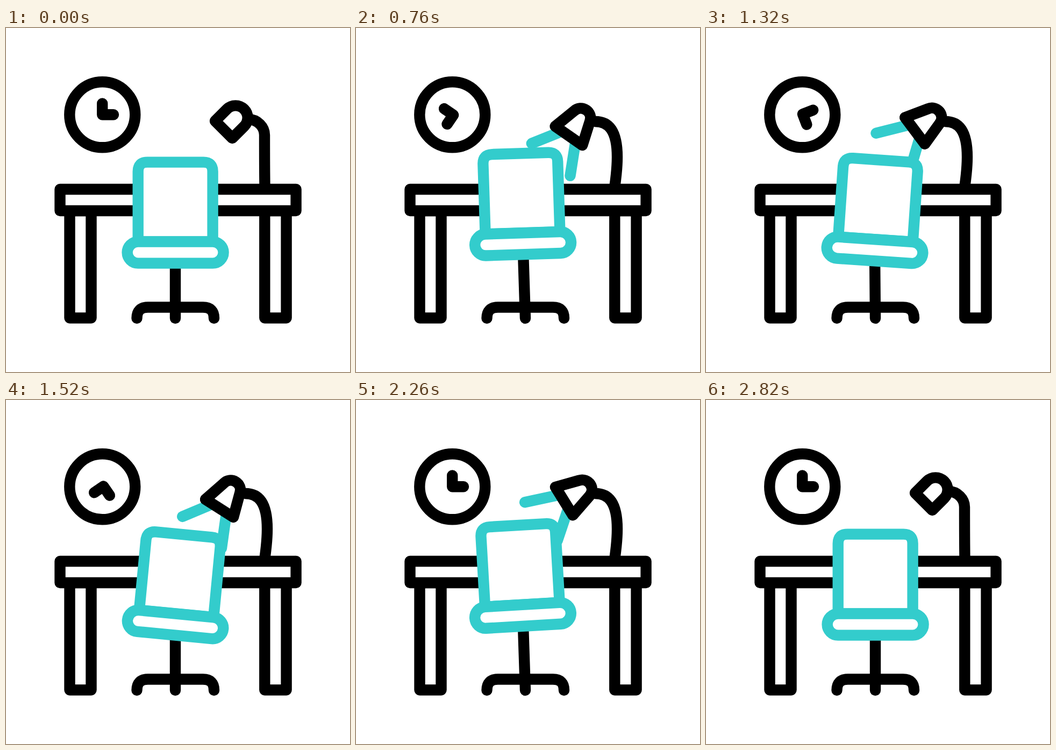
These frames come from a looping animation (640x640 px, 3220 ms). An HTML page:

```html
<!DOCTYPE html>
<html lang="en">
<head>
<meta charset="utf-8">
<title>Desk</title>
<style>
  html, body { margin: 0; width: 100%; height: 100%; overflow: hidden; background: #fff; }
  svg { display: block; width: 100%; height: 100%; }
</style>
</head>
<body>
<svg viewBox="0 0 640 640" fill="none" stroke="#000" stroke-width="20.4" stroke-linecap="round" stroke-linejoin="round">
  <circle cx="179.3" cy="161.3" r="61"/>
  <path id="hands" d="M179.2 140.5V161.2H200"/>
  <path id="post"/>
  <path id="beams" stroke="#33cccc"/>
  <path id="head" fill="#fff"/>
  <path d="M118.5 340H158.5V539.5H118.5ZM481.3 340H521.6V539.5H481.3Z"/>
  <path d="M100.5 300H539.6V340H100.5Z" fill="#fff"/>
  <path d="M243.5 540Q243.5 519.5 264 519.5H366.5Q387 519.5 387 540"/>
  <g id="stand">
    <path d="M315 540V425"/>
    <g id="chair" stroke="#33cccc" fill="#fff">
      <path d="M245.7 397.5V267Q245.7 249.6 263 249.6H367.3Q384.6 249.6 384.6 267V397.5Z"/>
      <rect x="225.6" y="397.6" width="179" height="40" rx="20"/>
    </g>
  </g>
</svg>
<script>
const LOOP = 3220, STEP = 20, START = 200, END = 2820;
const el = id => document.getElementById(id);
const mix = (a, b, k) => a + (b - a) * k;
const mixPoint = (a, b, k) => a.map((v, i) => mix(v, b[i], k));
const ramp = (t, t0, t1) => Math.min(1, Math.max(0, (t - t0) / (t1 - t0)));
const wave = u => (1 - Math.cos(2 * Math.PI * u)) / 2;
const ease = (t, t0, t1) => wave(ramp(t, t0, t1) / 2);
const smooth = x => x * x * (3 - 2 * x);
// Rises after START and falls back before END
const hold = (t, span) => ease(t, START, START + span) - ease(t, END - span, END);

function turn([x, y], deg, cx, cy) {
  const a = deg * Math.PI / 180, c = Math.cos(a), s = Math.sin(a);
  return [cx + (x - cx) * c - (y - cy) * s, cy + (x - cx) * s + (y - cy) * c];
}

// Lamp head: two opening corners around the dome, at rest and wide open
const headShut = [[389, 173], [411, 151], [443, 183], [421, 205]];
const headOpen = [[371, 185], [405.3, 154.8], [435.2, 172.9], [423, 218]];
const rays = [[[402, 186], [328.3, 217]], [[412, 197], [401, 276]]];

function drawLamp(t) {
  const bend = hold(t, 450), glow = hold(t, 410);
  const nod = smooth(wave(2 * ramp(t, 560, END)));

  const x = 481 + 5 * bend, y = 170 + 4 * bend;
  el("post").setAttribute("d",
    `M${451 - 6 * bend} ${y}C468 ${y} ${x} ${y + 14} ${x} ${199 + 41 * bend}Q${x} 262 481.5 294`);

  const tilt = mix(58, 29, bend * (1 - nod)) - 32.2;
  const [a, b, c, d] = headShut.map((p, i) => mixPoint(p, turn(headOpen[i], tilt, 421.3, 173.4), bend));
  const r = mix(22.6, 18, bend);
  el("head").setAttribute("d", `M${a}L${b}A${r} ${r} 0 0 1 ${c}L${d}Z`);

  const sweep = (12 * nod - 1.3) * bend;
  const ray = ([from, to]) =>
    `M${turn(from, sweep, 464, 128)}L${turn(mixPoint(from, to, glow), sweep, 464, 128)}`;
  el("beams").setAttribute("d", glow > 0.001 ? rays.map(ray).join("") : "");
}

function drawChair(t) {
  const mid = 1540;
  const rise = 17.5 * (wave(ramp(t, START, mid)) + wave(ramp(t, mid, END)));
  const sway = 5.6 * ease(t, 960, 1480) - 7 * ease(t, 1480, 1950) + 1.4 * ease(t, 2260, END);
  el("stand").setAttribute("transform", `rotate(${-0.113 * rise} 315 540)`);
  el("chair").setAttribute("transform", `translate(0 ${-rise}) rotate(${sway} 315 417.5)`);
}

function draw(t) {
  el("hands").setAttribute("transform", `rotate(${720 * ramp(t, START, 2080)} 180.3 161.2)`);
  drawLamp(t);
  drawChair(t);
}

const begin = performance.now();
function tick() {
  const t = (performance.now() - begin) % LOOP;
  draw(Math.floor(t / STEP) * STEP);
  requestAnimationFrame(tick);
}
draw(0);
requestAnimationFrame(tick);
</script>
</body>
</html>
```
